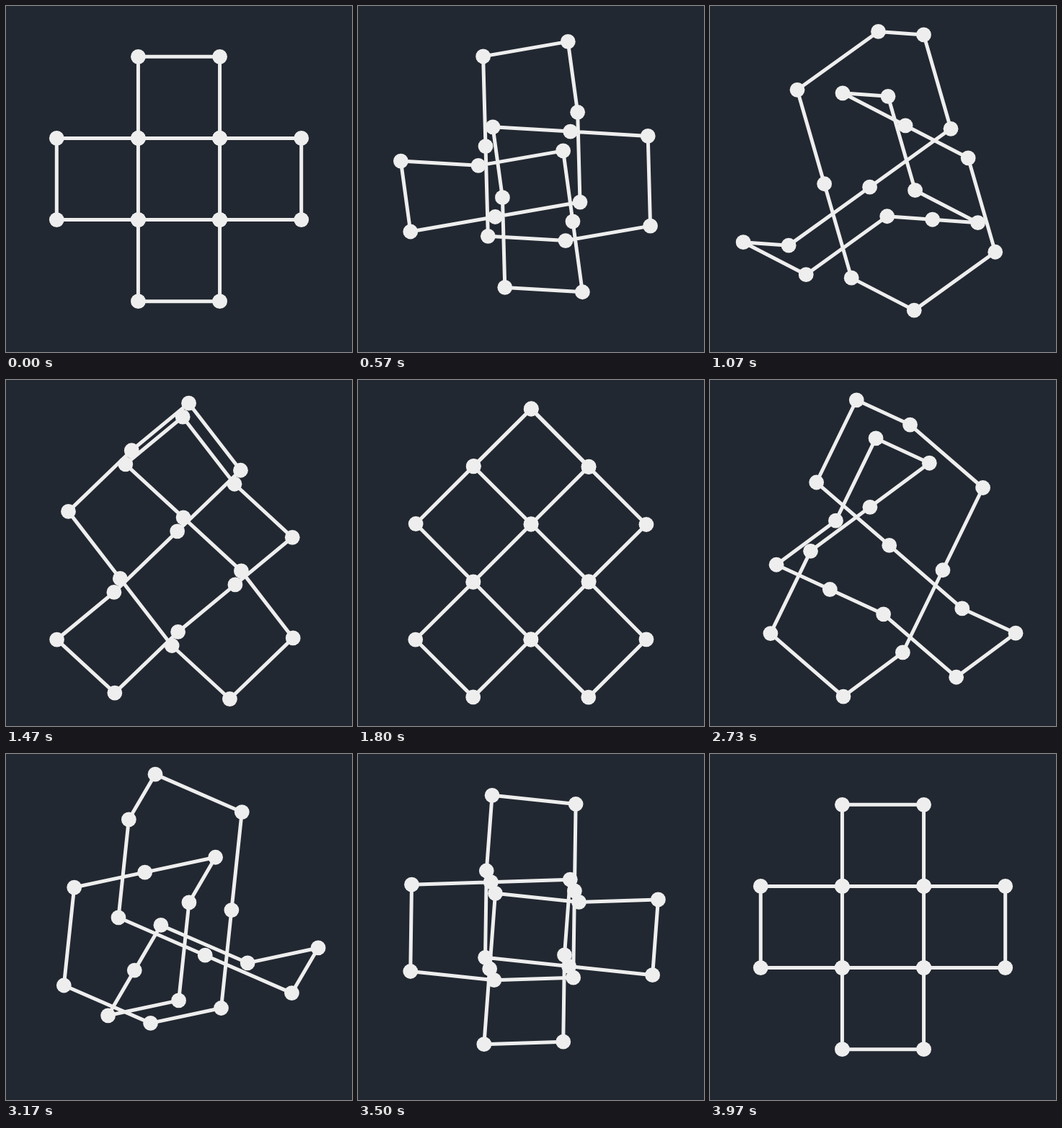
Recreate the animation shown at these times as an HTML page with a canvas. Size 480 px wide and 480 px high, loop 4010 ms.

```html
<!DOCTYPE html>
<html lang="en">
<head>
<meta charset="utf-8">
<title>Turning wireframe</title>
<style>
  html, body { margin: 0; width: 100%; height: 100%; overflow: hidden; background: #222831; }
  canvas { display: block; width: 480px; height: 480px; }
</style>
</head>
<body>
<canvas id="stage" width="480" height="480"></canvas>
<script>
const ctx = document.getElementById('stage').getContext('2d');
const LOOP = 4010, HALF = 2000, SIZE = 160;
const INK = '#eeeeee', PAPER = '#222831';
const DOT = 10.4, LINE = 5;

// Closed path through 3D space: capitals walk an edge backwards.
const PATH = 'abcAABdabbDCBddcADCC';

// Each half loop turns three orthogonal axes about one fixed direction.
const H = Math.SQRT1_2;
const TURN = Math.acos((H - 1) / 2);
const TURNS = [
  { about: unit([1 + H, H, -H]), axes: [[H, H, 0], [0, 0, 1], [H, -H, 0]] },
  { about: unit([1 + H, -H, -H]), axes: [[1, 0, 0], [0, -1, 0], [0, 0, -1]] }
];

function unit(v) {
  const len = Math.hypot(...v);
  return v.map(c => c / len);
}

function rotate(v, n, angle) {
  const c = Math.cos(angle), s = Math.sin(angle);
  const along = (n[0] * v[0] + n[1] * v[1] + n[2] * v[2]) * (1 - c);
  const cross = [
    n[1] * v[2] - n[2] * v[1],
    n[2] * v[0] - n[0] * v[2],
    n[0] * v[1] - n[1] * v[0]
  ];
  return v.map((x, i) => x * c + cross[i] * s + n[i] * along);
}

// Seventh-order smoothstep
const ease = t => t ** 4 * (35 - 84 * t + 70 * t * t - 20 * t ** 3);

// Thirty pictures a second on a 10 ms clock, with a short rest at the start
function motionTime(ms) {
  const tick = Math.min(119, Math.floor(0.3 * Math.floor(ms / 10) + 0.15));
  return tick < 3 ? 0 : tick * 100 / 3 + 11;
}

function vertices(time) {
  const { about, axes } = TURNS[time < HALF ? 0 : 1];
  const angle = TURN * ease((time % HALF) / HALF);
  const [u, p, q] = axes.map(v => rotate(v, about, angle));
  const edge = (j, k) => [0, 1].map(i => (u[i] + j * p[i] + k * q[i]) * SIZE / 2);
  const edges = { a: edge(1, 1), b: edge(1, -1), c: edge(-1, -1), d: edge(-1, 1) };

  let x = 0, y = 0;
  const points = [...PATH].map(step => {
    const key = step.toLowerCase(), sign = step === key ? 1 : -1;
    x += sign * edges[key][0];
    y += sign * edges[key][1];
    return [x, y];
  });
  const mean = i => points.reduce((sum, pt) => sum + pt[i], 0) / points.length;
  const dx = 240 - mean(0), dy = 240 - mean(1);
  return points.map(pt => [pt[0] + dx, pt[1] + dy]);
}

function draw(ms) {
  const points = vertices(motionTime(ms));
  ctx.fillStyle = PAPER;
  ctx.fillRect(0, 0, 480, 480);
  ctx.strokeStyle = ctx.fillStyle = INK;
  ctx.lineWidth = LINE;
  ctx.lineJoin = 'round';

  ctx.beginPath();
  points.forEach(pt => ctx.lineTo(...pt));
  ctx.closePath();
  ctx.stroke();

  for (const [x, y] of points) {
    ctx.beginPath();
    ctx.arc(x, y, DOT, 0, Math.PI * 2);
    ctx.fill();
  }
}

const start = performance.now();
function loop() {
  draw((performance.now() - start) % LOOP);
  requestAnimationFrame(loop);
}
loop();
</script>
</body>
</html>
```
